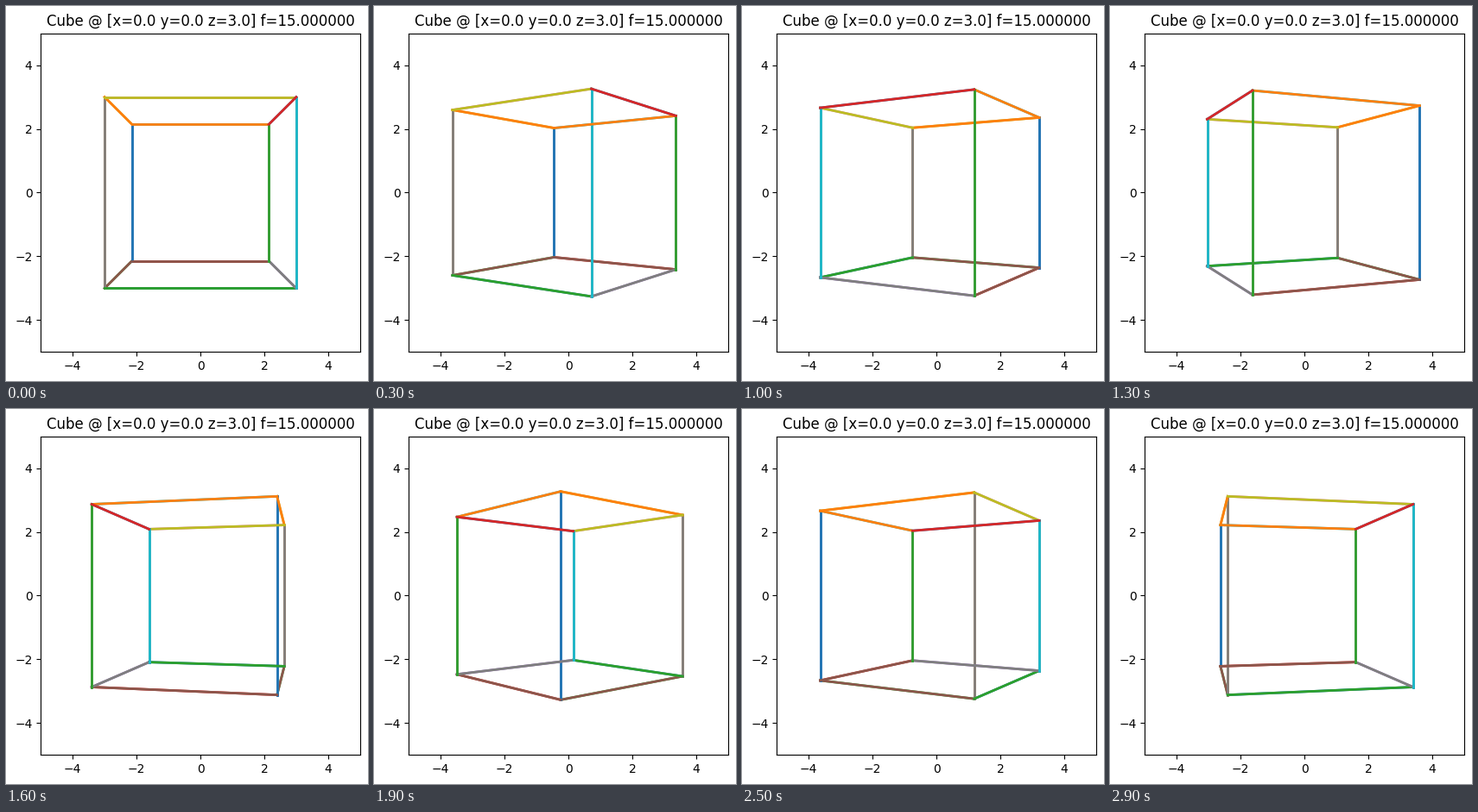
A matplotlib script for the animation above (3 s loop, 419 px wide and 435 px high).

```python
import itertools

import matplotlib.pyplot as plt
import numpy as np
from matplotlib.animation import FuncAnimation

W, H, DPI = 419, 435, 100
FRAMES, INTERVAL = 30, 100
FOCAL = 15.0
CENTER = np.array([0.0, 0.0, 3.0])

# Corner index bits are x, y, z; flipping one bit gives a neighbour.
CORNERS = np.array(list(itertools.product((-0.5, 0.5), repeat=3)))
EDGES = [(i, i ^ bit) for i in range(8) for bit in (4, 2, 1)]


def project(angle):
    """Turn the cube about its vertical axis and project it."""
    c, s = np.cos(angle), np.sin(angle)
    turn = np.array([[c, 0, s], [0, 1, 0], [-s, 0, c]])
    x, y, z = (CORNERS @ turn.T + CENTER).T
    return FOCAL * x / z, FOCAL * y / z


eps = 1e-6  # keeps the pixel size from rounding down
fig = plt.figure(figsize=(W / DPI + eps, H / DPI + eps), dpi=DPI,
                 facecolor="white")
side = 369.6
ax = fig.add_axes([40.2 / W, 33.7 / H, side / W, side / H])
ax.set_xlim(-5, 5)
ax.set_ylim(-5, 5)
ax.set_xticks(range(-4, 5, 2))
ax.set_yticks(range(-4, 5, 2))
ax.set_title("Cube @ [x=%.1f y=%.1f z=%.1f] f=%f" % (*CENTER, FOCAL))

# Each edge is drawn from both of its ends, the later colour on top.
lines = [ax.plot([], [], color=f"C{n % 10}", lw=2)[0]
         for n in range(len(EDGES))]


def update(frame):
    x, y = project(2 * np.pi * frame / FRAMES)
    for line, (a, b) in zip(lines, EDGES):
        line.set_data([x[a], x[b]], [y[a], y[b]])
    return lines


anim = FuncAnimation(fig, update, frames=FRAMES, interval=INTERVAL,
                     init_func=lambda: update(0), repeat=True,
                     repeat_delay=0, blit=False)

plt.show()
```
